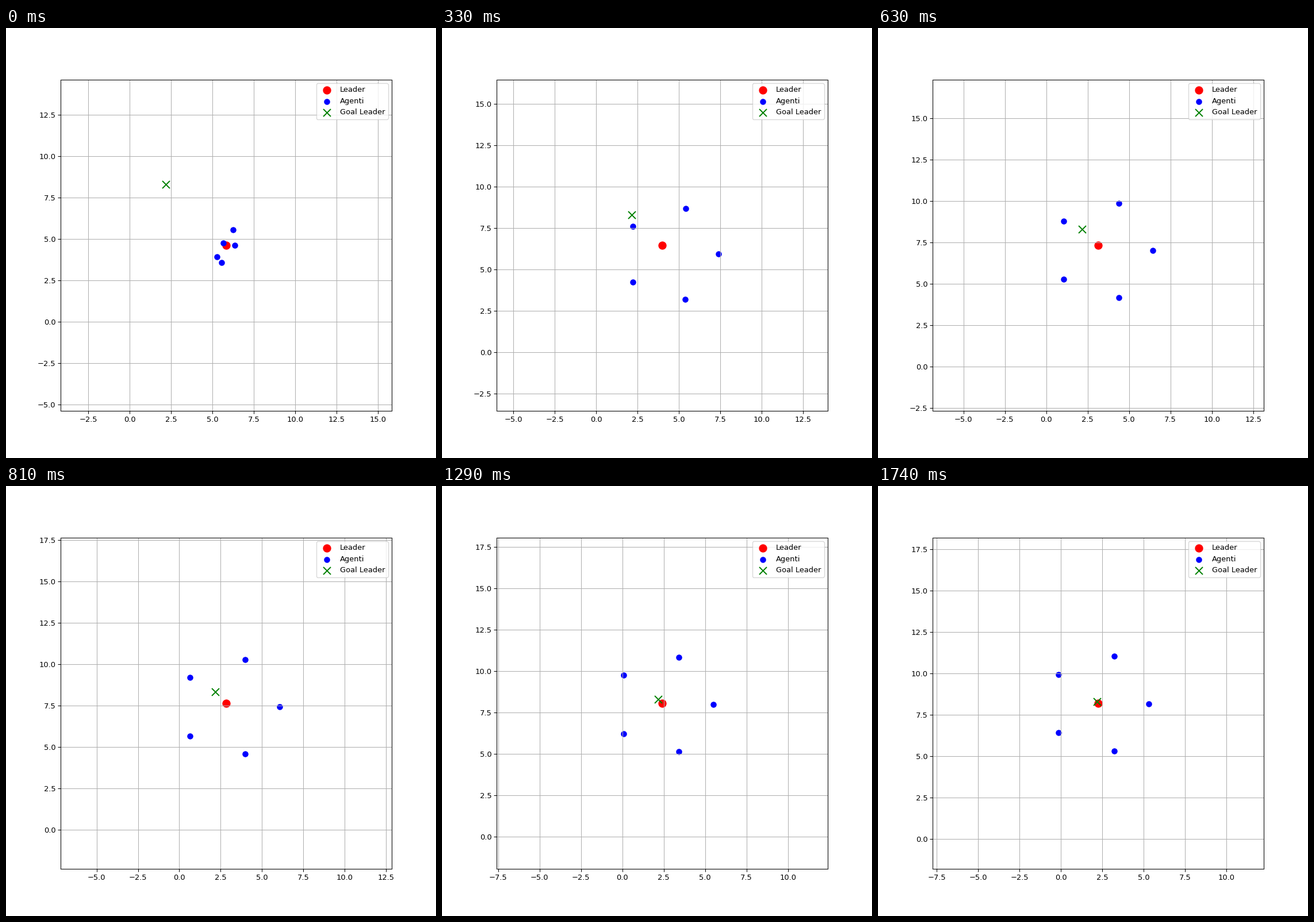
Recreate the animation shown at these times as a matplotlib script. Size 748 by 748 pixels, loop 1800 ms.

```python
import numpy as np
import matplotlib.pyplot as plt
from matplotlib.animation import FuncAnimation

INCHES, DPI = 8, 93.5                # 748 x 748 pixels
STEPS, INTERVAL = 60, 30
VIEW = 10

GOAL = np.array([2.171, 8.308])
GAP = np.array([3.668, -3.668])      # leader minus goal at the start
LEADER_RATE, AGENT_RATE = 0.0629, 0.256
LAG = LEADER_RATE / (AGENT_RATE - LEADER_RATE)

angles = 2 * np.pi * np.arange(5) / 5
RING = 3 * np.column_stack([np.cos(angles), np.sin(angles)])
START = np.array([[0.526, -0.01], [0.405, 0.927], [-0.186, 0.146],
                  [-0.568, -0.694], [-0.307, -1.052]])


def positions(t):
    """Leader decays toward the goal; agents chase their ring slots around it."""
    gap = GAP * np.exp(-LEADER_RATE * t)
    leader = GOAL + gap
    settle = (START - RING - LAG * GAP) * np.exp(-AGENT_RATE * t)
    return leader, leader + RING + LAG * gap + settle


fig, ax = plt.subplots(figsize=(INCHES, INCHES), dpi=DPI)
ax.set_aspect("equal")
ax.grid(True)

leader0, agents0 = positions(0)
leader_dot = ax.scatter(*leader0, c="red", s=100, label="Leader")
agent_dots = ax.scatter(*agents0.T, c="blue", s=50, label="Agenti")
ax.scatter(*GOAL, c="green", s=100, marker="x", label="Goal Leader")
ax.legend(loc="upper right")


def update(i):
    leader, agents = positions(min(i, STEPS - 2))  # hold the last pose
    leader_dot.set_offsets([leader])
    agent_dots.set_offsets(agents)
    ax.set_xlim(leader[0] - VIEW, leader[0] + VIEW)
    ax.set_ylim(leader[1] - VIEW, leader[1] + VIEW)
    return leader_dot, agent_dots


anim = FuncAnimation(fig, update, frames=STEPS, interval=INTERVAL,
                     repeat=True, repeat_delay=0, blit=False)
plt.show()
```
